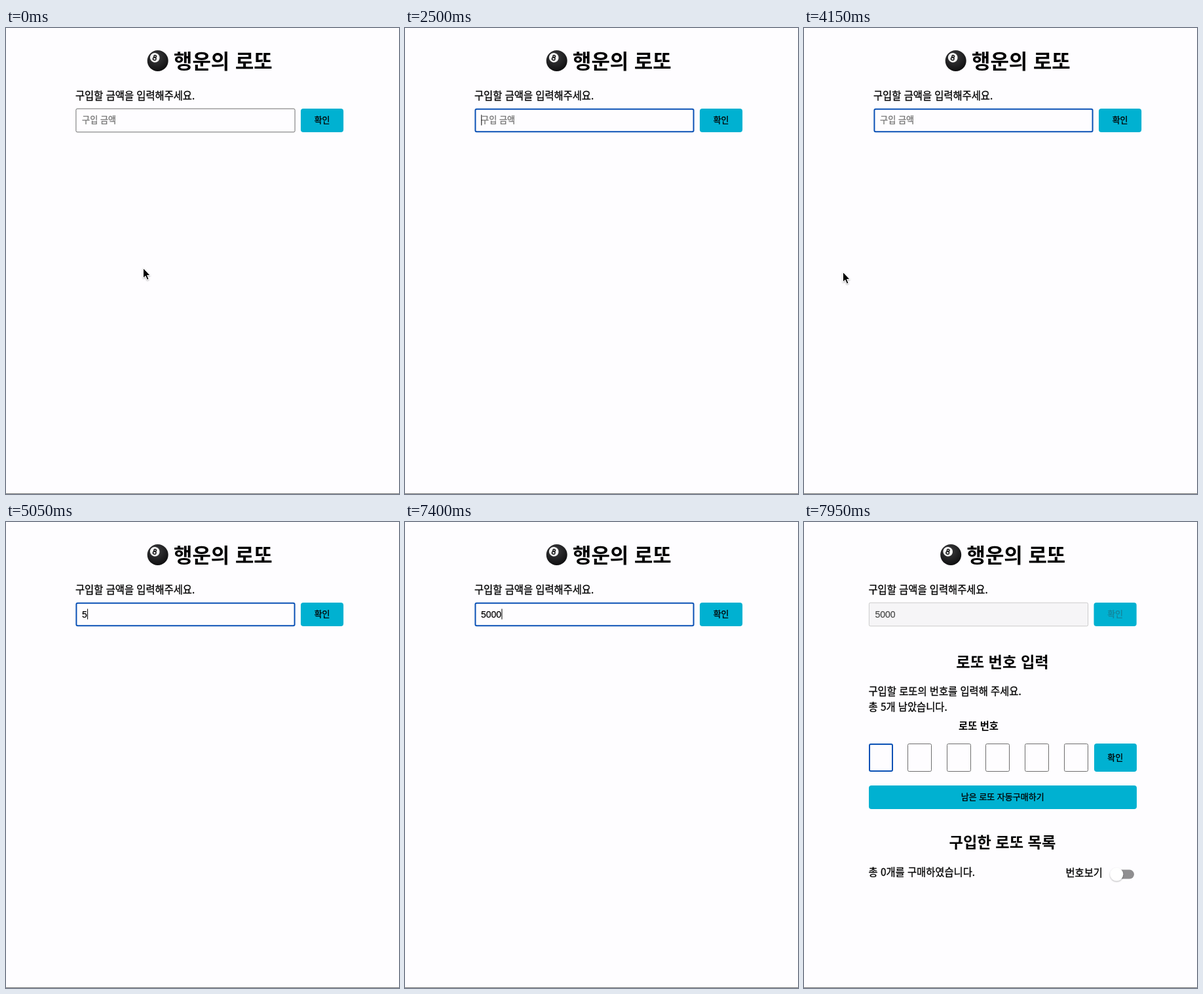
Write an HTML page that moves like this. It is 600 px wide and 711 px high and loops after 8000 ms.

```html
<!DOCTYPE html>
<html lang="ko">
<head>
<meta charset="utf-8">
<title>행운의 로또</title>
<style>
html, body { margin: 0; width: 100%; height: 100%; overflow: hidden; background: #fefdff; }
svg { display: block; width: 600px; height: 711px; }
text {
  font-family: "Noto Sans CJK KR", "Noto Sans CJK", sans-serif; font-size: 15.35px;
  color: #000; fill: currentColor; stroke: currentColor; stroke-width: .3; white-space: pre;
}
.title { font-size: 30.9px; font-weight: 700; stroke: none; }
.heading { font-size: 23.25px; font-weight: 700; text-anchor: middle; stroke: none; }
.strong { font-weight: 700; text-anchor: middle; stroke: none; }
.label { font-size: 13px; font-weight: 500; text-anchor: middle; }
.hint { font-size: 13.2px; color: #757575; }
.value { font: 14px "Liberation Sans", Arial, sans-serif; stroke-width: .2; }
.cyan { fill: #00b1d1; }
.box { fill: #fefdff; stroke: #6e6e6e; stroke-width: 1; }
.focus { stroke: #0a51b5; stroke-width: 2; }
.disabled { fill: #f6f5f7; stroke: #cbcbcb; }
</style>
</head>
<body>
<svg viewBox="0 0 600 711">
  <defs>
    <radialGradient id="ball" cx=".42" cy=".3" r=".75">
      <stop offset="0" stop-color="#3c3c3e"/>
      <stop offset=".55" stop-color="#232325"/>
      <stop offset="1" stop-color="#0b0b0c"/>
    </radialGradient>
    <filter id="shade" x="-50%" y="-50%" width="200%" height="200%">
      <feDropShadow dx="0" dy="1" stdDeviation="1.3" flood-opacity=".35"/>
    </filter>
  </defs>
  <rect width="600" height="711" fill="#fefdff"/>
  <rect y="710" width="600" height="1" fill="#777"/>

  <g id="form">
    <circle cx="231.7" cy="50" r="16" fill="url(#ball)"/>
    <g transform="translate(227.2 45.2) rotate(14)">
      <ellipse rx="7.4" ry="7.2" fill="#f4f4f4"/>
      <g fill="none" stroke="#1c1c1d" stroke-width="1.6">
        <ellipse cy="-2" rx="1.8" ry="1.6"/>
        <ellipse cy="1.9" rx="2.3" ry="2.1"/>
      </g>
    </g>
    <text class="title" x="256" y="62">행운의 로또</text>
    <text x="106" y="109.3">구입할 금액을 입력해주세요.</text>
    <rect id="field" class="box" rx="2"/>
    <text id="hint" class="hint" x="116" y="145">구입 금액</text>
    <text id="value" class="value" x="116" y="145.5"></text>
    <rect id="caret" y="132.5" width="1" height="16"/>
    <rect class="cyan" x="450" y="123" width="65.2" height="36" rx="4"/>
    <text id="submit" class="label" x="482.6" y="145">확인</text>
  </g>

  <g id="lotto">
    <text class="heading" x="303" y="222">로또 번호 입력</text>
    <text x="98.5" y="264">구입할 로또의 번호를 입력해 주세요.</text>
    <text x="98.5" y="288">총 5개 남았습니다.</text>
    <text class="strong" x="266.5" y="317">로또 번호</text>
    <g id="cells"></g>
    <rect class="cyan" x="443" y="338" width="65" height="43" rx="4"/>
    <text class="label" x="475.2" y="363.5">확인</text>
    <rect class="cyan" x="99" y="402" width="409" height="36" rx="4"/>
    <text class="label" x="303.2" y="424">남은 로또 자동구매하기</text>
    <text class="heading" x="303" y="497">구입한 로또 목록</text>
    <text x="98.5" y="540">총 0개를 구매하였습니다.</text>
    <text x="399.5" y="541">번호보기</text>
    <rect x="470" y="530.6" width="34" height="14" rx="7" fill="#8f8e90"/>
    <circle cx="477.3" cy="537.6" r="10" fill="#fff" filter="url(#shade)"/>
  </g>

  <path id="pointer" d="M0 0V15.4L3.5 12.1L6 18L8.6 16.9L6.1 11.2H10.6Z"
    stroke="#fff" stroke-width="1" stroke-linejoin="round" filter="url(#shade)"/>
</svg>
<script>
const LOOP = 8000, FOCUS = 2300, SUBMIT = 7450;
const KEYS = [[4800, '5'], [5600, '0'], [5850, '0'], [6100, '0']];
const DIGIT = 14 * 0.556;
const $ = id => document.getElementById(id);
const show = (id, on) => $(id).setAttribute('visibility', on ? 'visible' : 'hidden');

function setAttrs(el, attrs) {
  for (const key in attrs) el.setAttribute(key, attrs[key]);
}

// Keeps the outer edge in place whatever the border width.
function frameBox(el, x, y, w, h, line) {
  setAttrs(el, { x: x + line / 2, y: y + line / 2, width: w - line, height: h - line });
}

for (let i = 0; i < 6; i++) {
  const cell = document.createElementNS('http://www.w3.org/2000/svg', 'rect');
  setAttrs(cell, { class: i ? 'box' : 'box focus', rx: 2 });
  frameBox(cell, Math.floor(99 + i * 59.6), 338, 37, 43, i ? 1 : 2);
  $('cells').append(cell);
}

function ease(t, start, end) {
  const p = Math.min(1, Math.max(0, (t - start) / (end - start)));
  return p * p * (3 - 2 * p);
}

function pointerAt(t) {
  if (t < 2500) return [209.5 - 230 * ease(t, 2000, 2300), 366.3 - 2 * ease(t, 2000, 2300)];
  return [-20 + 79.4 * ease(t, 2650, 2950), 372.3];
}

function draw(t) {
  const done = t >= SUBMIT;
  const focused = t >= FOCUS && !done;
  const typed = KEYS.filter(([at]) => t >= at);
  const blinkStart = typed.length ? typed[typed.length - 1][0] : FOCUS;

  $('form').setAttribute('transform', `translate(${done ? -7.5 : 0} 0)`);
  $('field').setAttribute('class', 'box' + (focused ? ' focus' : done ? ' disabled' : ''));
  frameBox($('field'), 106.4, 122.7, 335.2, 36.6, focused ? 2 : 1);
  show('hint', !typed.length);
  $('value').textContent = typed.map(([, key]) => key).join('');
  $('value').style.color = done ? '#484848' : '#000';
  $('submit').style.color = done ? '#16849a' : '#000';
  $('caret').setAttribute('x', 116.3 + typed.length * DIGIT);
  show('caret', focused && (t - blinkStart) % 1000 < 500);
  show('lotto', done);

  const [x, y] = pointerAt(t);
  $('pointer').setAttribute('transform', `translate(${x} ${y})`);
  show('pointer', !typed.length);
}

function tick() {
  draw(performance.now() % LOOP);
  requestAnimationFrame(tick);
}
tick();
</script>
</body>
</html>
```
